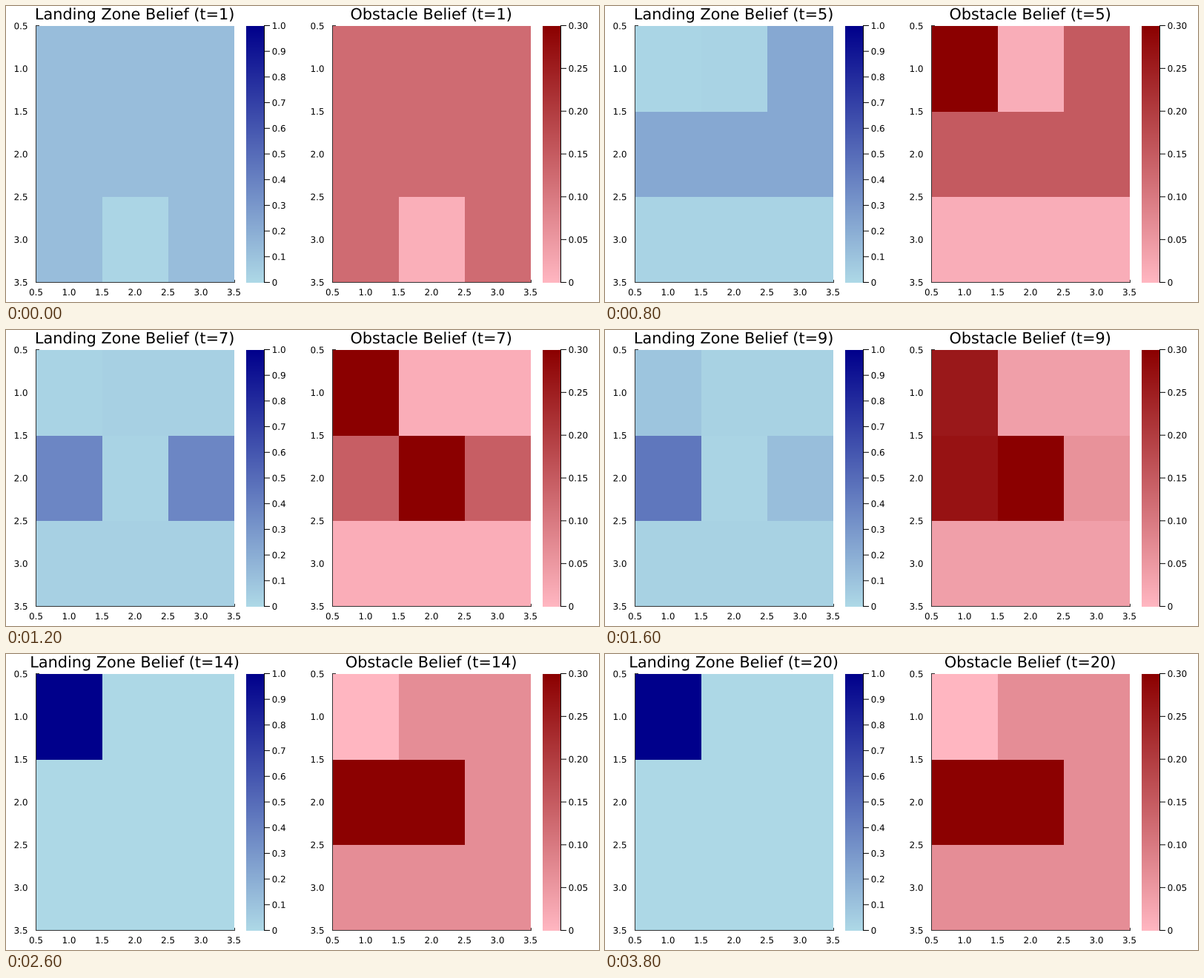
Write a matplotlib script that moves like this. It is 800 by 400 pixels and loops after 4000 ms.

```python
import numpy as np
import matplotlib.pyplot as plt
from matplotlib.animation import FuncAnimation
from matplotlib.colors import LinearSegmentedColormap
from matplotlib.patches import PathPatch
from matplotlib.textpath import TextPath
from matplotlib.transforms import Affine2D

W, H, DPI = 800, 400, 100
STEPS = 20
TOP, BOTTOM = 27, 373.5
ROWS = [27, 143, 258, 374]
TITLE, TICK = 20.8, 11.9
ADVANCE = {"left": 0, "center": 0.5, "right": 1}
FONT = {"family": "DejaVu Sans"}
SPINE = "#333333"

blues = LinearSegmentedColormap.from_list(
    "blues", [(173 / 255, 216 / 255, 230 / 255), (0, 0, 139 / 255)], 512)
reds = LinearSegmentedColormap.from_list(
    "reds", [(1, 182 / 255, 193 / 255), (139 / 255, 0, 0)], 512)

# Cells searched in order, and whether an obstacle was sensed there.
SEARCH = [((2, 1), False), ((2, 2), False), ((2, 0), False), ((0, 1), False),
          ((0, 0), True), ((0, 2), False), ((1, 1), True)]


def grid(base, **cells):
    """3x3 grid of one value, with cells such as c01=0.4 overridden."""
    g = np.full((3, 3), float(base))
    for key, value in cells.items():
        g[int(key[1]), int(key[2])] = value
    return g


def search_beliefs():
    land, obst = np.ones((3, 3)), np.ones((3, 3))
    for cell, hit in SEARCH:
        land[cell] *= 0.07 if hit else 0.1
        obst[cell] *= 2.2 if hit else 0.1
        yield land / land.sum(), obst / obst.sum()


LATE = [
    (grid(0.036, c00=0.03, c10=0.38, c11=0.025, c12=0.38),
     grid(0.022, c00=0.31, c10=0.25, c11=0.32, c12=0.13)),
    (grid(0.03, c00=0.09, c10=0.45, c11=0.02, c12=0.12),
     grid(0.038, c00=0.26, c10=0.27, c11=0.31, c12=0.06)),
    (grid(0.015, c00=0.5, c10=0.32, c11=0.01),
     grid(0.053, c00=0.12, c10=0.275, c11=0.3)),
    (grid(0.004, c00=0.92, c10=0.05, c11=0),
     grid(0.065, c00=0.036, c10=0.282, c11=0.298)),
    (grid(0.0, c00=0.99, c10=0.004),
     grid(0.067, c00=0.006, c10=0.296, c11=0.298)),
    (grid(0, c00=1), grid(0.067, c00=0, c10=0.298, c11=0.298)),
]
BELIEFS = list(search_beliefs()) + LATE

fig = plt.figure(figsize=(W / DPI, H / DPI), dpi=DPI, facecolor="white")
ax = fig.add_axes([0, 0, 1, 1])
ax.axis("off")


def glyphs(x, y, text, align, size):
    """Outline of a line of text with its baseline at y."""
    path = TextPath((0, 0), text, size=size, prop=FONT)
    # A closing bar on both sides turns ink extents into an advance width.
    bar = TextPath((0, 0), "|", size=size, prop=FONT).get_extents()
    framed = TextPath((0, 0), f"|{text}|", size=size, prop=FONT).get_extents()
    advance = framed.width - bar.width - (bar.x0 + bar.x1)
    advance += bar.width
    shift = x - ADVANCE[align] * advance
    return Affine2D().scale(1, -1).translate(shift, y).transform_path(path)


def label(x, y, text, align, size=TICK):
    patch = PathPatch(glyphs(x, y, text, align, size), fc="black", lw=0,
                      snap=False, zorder=5)
    return ax.add_patch(patch)


def line(xs, ys, width=1, color="black"):
    ax.plot(xs, ys, color=color, lw=width * 72 / DPI, zorder=3, snap=False,
            solid_capstyle="butt")


class Panel:
    def __init__(self, left, name, cmap, vmax, ticks, fmt):
        self.name = name
        self.middle = left + 133.5
        cols = [left, left + 89, left + 178, left + 267]
        self.mesh = ax.pcolormesh(cols, ROWS, np.zeros((3, 3)), cmap=cmap,
                                  vmin=0, vmax=vmax, antialiased=False,
                                  edgecolors="none", zorder=2)
        self.title = label(self.middle, 18.15, "t", "center", TITLE)
        self.axes(left)
        self.bar(left + 283, cmap, vmax, ticks, fmt)

    def axes(self, left):
        right = left + 267
        line([left - 0.5] * 2, [TOP - 1, 374], color=SPINE)
        line([left - 1, right + 1], [373.5] * 2, color=SPINE)
        line([left, left + 4], [TOP - 0.5] * 2, color=SPINE)
        line([right + 0.5] * 2, [370, 374], color=SPINE)
        for i in range(7):
            value = f"{0.5 + i / 2:.1f}"
            label(left + 44.5 * i, 391, value, "center")
            label(left - 10.5, TOP + 57.75 * i + 4.3, value, "right")

    def bar(self, x, cmap, vmax, ticks, fmt):
        ramp = np.linspace(vmax, 0, 347)[:, None]
        ax.pcolormesh([x, x + 24], np.linspace(TOP, 374, 348), ramp,
                      cmap=cmap, vmin=0, vmax=vmax, antialiased=False,
                      edgecolors="none", zorder=2)
        line([x + 24.5] * 2, [TOP - 0.5, 374])
        for i in range(ticks + 1):
            y = BOTTOM + (TOP - 0.5 - BOTTOM) * i / ticks
            line([x + 24, x + 32], [y, y])
            text = format(vmax * i / ticks, fmt) if i else "0"
            label(x + 34.7, y + 4.4, text, "left")

    def show(self, belief, t):
        self.mesh.set_array(belief)
        self.title.set_path(glyphs(self.middle, 18.15, f"{self.name} (t={t})",
                                   "center", TITLE))


panels = [Panel(41, "Landing Zone Belief", blues, 1.0, 10, ".1f"),
          Panel(441, "Obstacle Belief", reds, 0.3, 6, ".2f")]
ax.set_xlim(0, W)
ax.set_ylim(H, 0)


def update(i):
    beliefs = BELIEFS[min(i, len(BELIEFS) - 1)]
    for panel, belief in zip(panels, beliefs):
        panel.show(belief, i + 1)
    return []


anim = FuncAnimation(fig, update, frames=STEPS, interval=200,
                     init_func=lambda: [], repeat=True, repeat_delay=0,
                     blit=False)
plt.show()
```
